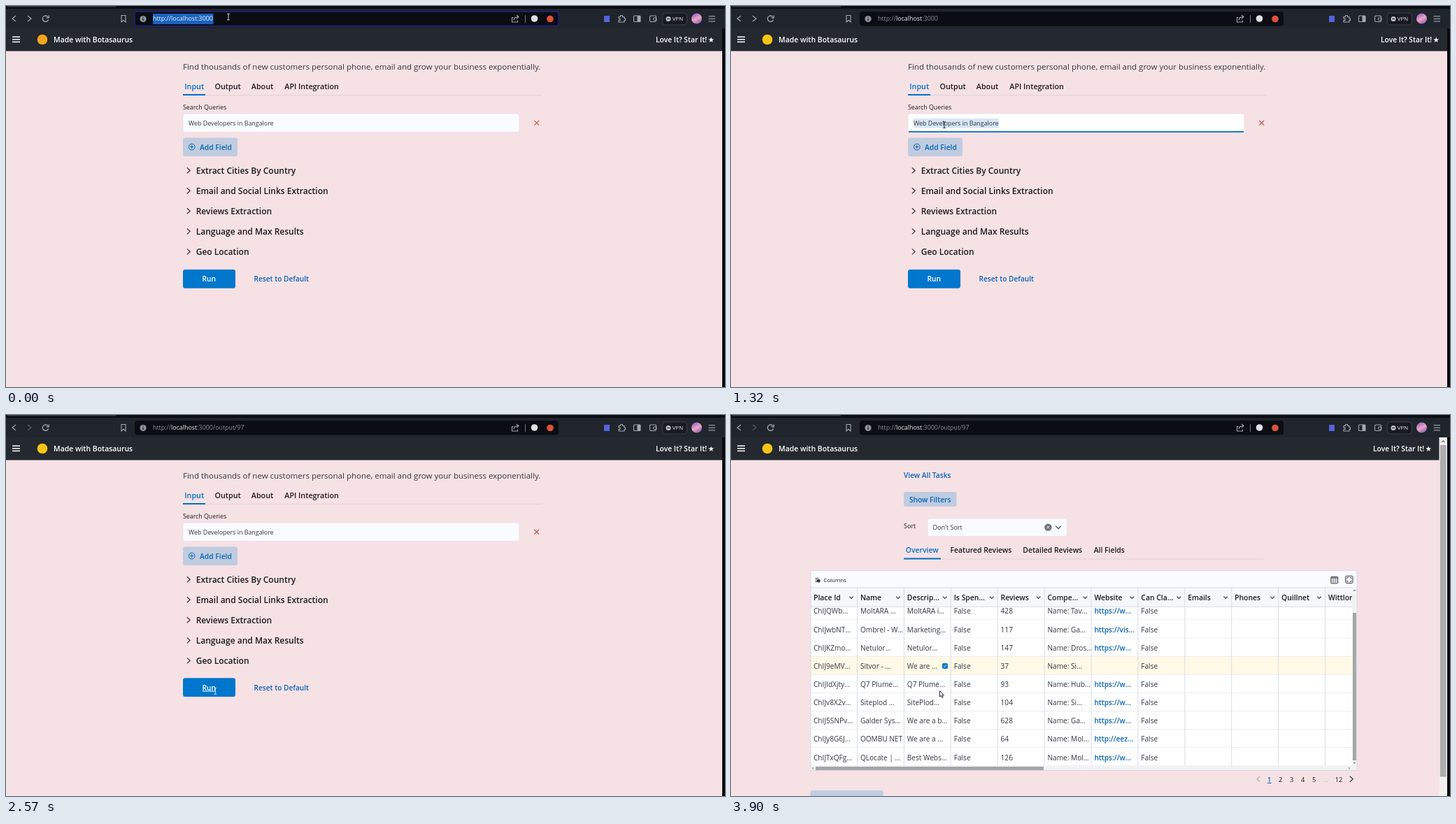
An HTML page with a canvas for the animation above (4430 ms loop, 1028 px wide and 545 px high).

```html
<!DOCTYPE html>
<html lang="en">
<head>
<meta charset="utf-8">
<title>Search tool demo</title>
<style>
html, body { margin: 0; width: 100%; height: 100%; overflow: hidden; background: #f6e1e5; }
canvas { display: block; width: 1028px; height: 545px; }
</style>
</head>
<body>
<canvas id="stage"></canvas>
<script>
const LOOP = 4430, W = 1028, H = 545;
const canvas = document.getElementById('stage');
const ctx = canvas.getContext('2d');
const dpr = window.devicePixelRatio || 1;
canvas.width = W * dpr;
canvas.height = H * dpr;

const PINK = '#f6e1e5', INK = '#1a1c21', BODY = '#343741', BLUE = '#0071c2';
const LINK = '#0a66b3', SOFT = '#c0cce0', FIELD = '#fafbfe', RULE = '#d8dde7', ICON = '#a4a8af';

// ---------- helpers ----------
function rect(x, y, w, h, color) {
  ctx.fillStyle = color;
  ctx.fillRect(x, y, w, h);
}
function box(x, y, w, h, r, fill, stroke, lw = 1) {
  ctx.beginPath();
  ctx.roundRect(x, y, w, h, r);
  if (fill) { ctx.fillStyle = fill; ctx.fill(); }
  if (stroke) { ctx.strokeStyle = stroke; ctx.lineWidth = lw; ctx.stroke(); }
}
function disc(x, y, r, fill, stroke, lw = 1) {
  ctx.beginPath();
  ctx.arc(x, y, r, 0, 7);
  if (fill) { ctx.fillStyle = fill; ctx.fill(); }
  if (stroke) { ctx.strokeStyle = stroke; ctx.lineWidth = lw; ctx.stroke(); }
}
function line(color, lw, ...p) {
  ctx.beginPath();
  for (let i = 0; i < p.length; i += 2) ctx.lineTo(p[i], p[i + 1]);
  ctx.strokeStyle = color;
  ctx.lineWidth = lw;
  ctx.stroke();
}
// Text vertically centred on its capital letters; returns its width.
function text(s, x, cy, size, color, weight = 400, align = 'left') {
  ctx.font = `${weight} ${size}px "Open Sans", "Noto Sans", sans-serif`;
  ctx.textAlign = align;
  ctx.fillStyle = color;
  ctx.fillText(s, x, cy + size * 0.36);
  return ctx.measureText(s).width;
}
const bold = (s, x, cy, size, color = INK, align) => text(s, x, cy, size, color, 600, align);
const chevron = (x, y, w, h, color, lw = 1.2) => line(color, lw, x - w, y - h, x + w, y, x - w, y + h);
const chevronDown = (x, y, w, color = BODY) => line(color, 1.1, x - w, y - w / 2, x, y + w / 2, x + w, y - w / 2);
function cross(x, y, r, color, lw) {
  line(color, lw, x - r, y - r, x + r, y + r);
  line(color, lw, x + r, y - r, x - r, y + r);
}
function menu(x, y, w, gap, color, lw) {
  for (const i of [-1, 0, 1]) line(color, lw, x, y + i * gap, x + w, y + i * gap);
}
function clip(x, y, w, h, draw) {
  ctx.save();
  ctx.beginPath();
  ctx.rect(x, y, w, h);
  ctx.clip();
  draw();
  ctx.restore();
}

// ---------- browser bar ----------
function address(t) {
  const selected = t < 130;
  box(184, 8, 606, 20.5, 4, '#0b0d13', selected && '#1f1f86', 1.6);
  disc(196, 18.5, 4.6, '#8f949b');
  rect(195.4, 17.8, 1.2, 3.2, '#14171c');
  rect(195.4, 15.6, 1.2, 1.2, '#14171c');
  if (selected) rect(210, 11, 86.5, 15, '#1b63bd');
  const dim = selected ? '#f2f6fc' : '#8c9097';
  const path = t >= 2430 ? ':3000/output/97' : ':3000';
  let x = 210;
  for (const [s, c] of [['http://', dim], ['localhost', '#eceef1'], [path, dim]])
    x += text(s, x, 18.2, 8.9, c);
}
function browser(t) {
  rect(0, 0, W, 33, '#20242c');
  rect(0, 0, W, 4, '#0b0d12');
  rect(2, 0, 155, 1.5, '#363b43');
  chevron(11.5, 18, -2.5, 4, ICON);
  chevron(33.5, 18, 2.5, 4, t >= 2430 ? '#555a62' : ICON);
  if (t >= 130 && t < 530) cross(56.5, 18, 3.5, ICON, 1.2);
  else {
    ctx.beginPath();
    ctx.arc(56.5, 18.2, 4.2, 0.3, 5.6);
    ctx.strokeStyle = ICON;
    ctx.lineWidth = 1.3;
    ctx.stroke();
    line(ICON, 1.3, 61.2, 13.5, 61.2, 16.8, 57.8, 16.8);
  }
  line(ICON, 1.1, 165, 13.5, 171, 13.5, 171, 23, 168, 20.3, 165, 23, 165, 13);
  address(t);

  line(ICON, 1.1, 725.5, 16.5, 723.5, 16.5, 723.5, 23, 731.5, 23, 731.5, 20.5);
  line(ICON, 1.1, 726, 20, 727.5, 16.5, 732.5, 15.5);
  line(ICON, 1.1, 730, 12.8, 733, 15.5, 730, 18.2);
  rect(742, 13, 1, 11, '#71757c');
  disc(755.5, 18, 4.8, '#dfe2e6');
  disc(778, 18.5, 4.8, '#e0523a');

  box(855, 14, 8, 9, 0, '#5663dc');
  line(ICON, 1.1, 876, 15.5, 878.5, 15.5, 878.5, 13.5, 881.5, 13.5, 881.5, 15.5, 884, 15.5, 884, 18,
    885.5, 18, 885.5, 20.5, 884, 20.5, 884, 23, 876, 23, 876, 20.5, 878, 20.5, 878, 18, 876, 18, 876, 15);
  box(897.5, 14, 9.5, 8.5, 1, null, ICON, 1.1);
  rect(902.5, 14, 4.5, 8.5, ICON);
  box(920.5, 14, 9, 8.5, 1.5, null, ICON, 1.1);
  box(925.5, 17, 4.5, 3.5, 1, null, ICON);
  box(938.5, 10, 35, 17, 4, '#171a20', '#3d424a');
  disc(947, 18.5, 3.6, '#b9bdc3');
  rect(945, 18, 4, 1, '#171a20');
  text('VPN', 952.8, 18.6, 7.8, '#eceef1');
  const g = ctx.createLinearGradient(983, 11, 991, 26);
  g.addColorStop(0, '#8b63c9');
  g.addColorStop(0.5, '#f0a5bd');
  g.addColorStop(1, '#7d58c2');
  disc(987.5, 18, 7.5, g);
  menu(1004.5, 18.3, 9.5, 3.6, ICON, 1.1);
}
function header(t, right) {
  rect(0, 32, 1024, 32.5, '#24282f');
  menu(9, 47.8, 11, 3.6, '#fff', 1.5);
  disc(52, 48, 7.3, t < 130 ? '#f6a41f' : '#fbc414');
  bold('Made with Botasaurus', 68, 48.3, 10.45, '#fff');
  bold('Love It? Star It!', right - 84, 48.3, 10.3, '#fff');
  ctx.font = '10.5px "DejaVu Sans", sans-serif';
  ctx.textAlign = 'right';
  ctx.fillText('★', right, 52);
}

// ---------- input page ----------
const SECTIONS = ['Extract Cities By Country', 'Email and Social Links Extraction',
  'Reviews Extraction', 'Language and Max Results', 'Geo Location'];

function tabs(labels, cy, size, lineY, x0, x1, activeEnd) {
  rect(x0, lineY - 0.5, x1 - x0, 1, '#e3d3da');
  rect(x0, lineY - 1.5, activeEnd - x0, 2, BLUE);
  labels.forEach(([s, x], i) => bold(s, x, cy, size, i ? INK : BLUE));
}
function inputPage(t) {
  const focused = t >= 860 && t < 1870, selected = t >= 920 && t < 1870;
  const hover = t >= 1570, lift = t >= 1940 ? -0.7 : 0;
  header(t, 1013);
  text('Find thousands of new customers personal phone, email and grow your business exponentially.',
    253, 87.3, 11.5, BODY);
  tabs([['Input', 255.3], ['Output', 298.5], ['About', 350.8], ['API Integration', 398.3]],
    115.3, 10.75, 127.5, 253, 766, 285);
  text('Search Queries', 253, 145.2, 8.8, INK);
  box(253, 154, 481, 26.5, 3, focused ? '#fff' : FIELD, '#ecdfe7', 0.8);
  if (focused) rect(254, 179, 479, 1.8, BLUE);
  if (selected) rect(261, 161, 122, 13.5, '#d6e7f3');
  text('Web Developers in Bangalore', 261, 168, 8.88, BODY);
  cross(758.7, 167.2, 3.4, t < 130 ? '#d4552f' : '#bd3f3f', 1.1);

  box(253, 188.5, 78, 26.5, 3, SOFT);
  disc(265.7, 201.6, 4.4, null, LINK, 1);
  line(LINK, 1, 263.2, 201.6, 268.2, 201.6);
  line(LINK, 1, 265.7, 199.1, 265.7, 204.1);
  bold('Add Field', 277, 202.2, 10.3, LINK);

  SECTIONS.forEach((s, i) => {
    const cy = 235.7 + i * 29.05;
    chevron(261, cy - 0.5, 2.2, 4, BODY);
    bold(s, 271.7, cy, 12);
  });
  box(253, 377 + lift, 75, 26.8, 3, '#0077cc');
  bold('Run', 290.3, 390.6 + lift, 10.2, '#fff', 'center');
  if (hover) rect(280.8, 395.3 + lift, 19.2, 1, '#fff');
  bold('Reset to Default', 354.5, 390.6, 10.15, LINK);
}

// ---------- results page ----------
const COL = 66.9, ROW = 26.13, TOP = 274.4;
const HEADS = ['Place Id', 'Name', 'Descrip…', 'Is Spen…', 'Reviews', 'Compe…',
  'Website', 'Can Cla…', 'Emails', 'Phones', 'Quillnet', 'Wittlor'];
const ROWS = [
  '8Wlw…;Tavuro - …;Tavuro is a…;599;PL…;https://w…',
  'QWb…;MoltARA …;MoltARA i…;428;Tav…;https://w…',
  'wbNT…;Ombrel - W…;Marketing…;117;Ga…;https://vis…',
  'KZmo…;Netulor…;Netulor…;147;Dros…;https://w…',
  '9eMV…;Sitvor - …;We are a …;37;Si…;',
  'IdXjty…;Q7 Plume…;Q7 Plume…;93;Hub…;https://w…',
  'v8X2v…;Siteplod …;SitePlod…;104;Si…;https://w…',
  '5SNPv…;Galder Sys…;We are a b…;628;Ga…;https://w…',
  'y8G6J…;OOMBU NET;We are a …;64;Mol…;http://eez…',
  'TxQFg…;QLocate | …;Best Webs…;126;Mol…;https://w…'
].map(r => r.split(';'));
const colX = i => 118 + i * COL;

function rows(t, scroll) {
  ROWS.forEach(([id, name, about, reviews, rival, site], i) => {
    const y = TOP + i * ROW - scroll, cy = y + 13.8;
    const editing = i === 4 && t >= 2970;
    rect(114, y, 774, ROW, i === 4 ? '#fff9e8' : '#fff');
    rect(114, y + ROW - 0.5, 774, 1, RULE);
    const cells = ['ChIJ' + id, name, editing ? 'We are …' : about, 'False', reviews, 'Name: ' + rival];
    cells.forEach((s, c) => text(s, colX(c), cy, 10.1, BODY));
    bold(site, colX(6), cy, 10.1, LINK);
    text('False', colX(7), cy, 10.1, BODY);
    if (editing) {
      box(302, cy - 4.2, 8, 8, 2, '#0077cc');
      line('#fff', 1, 304.3, cy + 1.8, 308, cy - 1.9);
    }
  });
}
function gridIcons(t) {
  if (t < 2690) {
    for (const [x, y, s] of [[120, 232, 7.5], [858, 231, 10], [879, 230.5, 10]]) box(x, y, s, s, 2, '#e7eaef');
    box(750, 516, 9, 9, 2, '#f0dee3');
    return;
  }
  menu(120.5, 236, 5, 2.4, BODY, 1);
  disc(125.3, 237.3, 2.4, BODY);
  box(857.8, 231.3, 9.8, 9.6, 1, null, BODY);
  rect(858, 232.5, 9.5, 1.2, BODY);
  for (const y of [236, 238.5]) line('#858a93', 0.8, 858, y, 867.5, y);
  for (const x of [861, 864.3]) line('#858a93', 0.8, x, 234, x, 240.5);
  box(878.8, 230.3, 10.2, 10.2, 1.5, null, BODY);
  for (const sx of [-1, 1]) for (const sy of [-1, 1])
    line(BODY, 0.9, 883.9 + sx * 3, 235.4 + sy, 883.9 + sx * 3, 235.4 + sy * 3, 883.9 + sx, 235.4 + sy * 3);
  chevron(754, 520.7, -2, 3.8, '#b9adb5');
}
function grid(t) {
  const scrolled = t >= 3900;
  rect(114, 222, 781, 286.5, '#fff');
  rect(114, 222, 781, 25, '#f9fbfd');
  rect(114, 247, 781, 27, '#f5f7fa');
  clip(114, 274.4, 774, 226.6, () => rows(t, scrolled ? 33.5 : 0));
  clip(114, 247, 774, 254, () => {
    HEADS.forEach((s, i) => {
      bold(s, colX(i), 261.5, 10.4);
      chevronDown(colX(i) + 54, 261, 2.8);
      rect(colX(i) + 62, 247, 1, 254, RULE);
    });
  });
  rect(114, 246.5, 781, 1, RULE);
  rect(114, 273.8, 774, 1, RULE);
  rect(888, 247, 7, 254, '#f3f3f4');
  rect(889, scrolled ? 283 : 255, 5, 211, '#a6a6a8');
  rect(114, 501, 781, 7.5, '#f3f3f4');
  rect(121, 503, 326, 5, '#a6a6a8');
  chevron(117, 505.3, -1, 1.4, '#8b8b8d', 1);
  chevron(884, 505.3, 1, 1.4, '#8b8b8d', 1);
  chevronDown(891.5, 251, -1.6, '#8b8b8d');
  chevronDown(891.5, 497.5, 1.6, '#8b8b8d');
  box(114, 222.5, 781, 286, 0, null, '#d3dae6', 1);
  text('Columns', 132.3, 236, 7.9, INK);
}
function resultsPage(t) {
  header(t, 1002);
  rect(1012.5, 32, 11.5, 513, '#f1f1f2');
  rect(1013.8, 43, 8.8, 474.5, '#adacae');
  chevronDown(1018.2, 38, -2.4, '#77777a');

  bold('View All Tasks', 247, 86.5, 10.2, LINK);
  box(247, 110, 75.5, 21, 3, SOFT);
  bold('Show Filters', 284.7, 121.3, 10.2, LINK, 'center');
  text('Sort', 247, 158.7, 9, INK);
  box(281, 148, 199.5, 25.5, 3, FIELD, '#ecdfe7', 0.8);
  text("Don't Sort", 288.5, 161, 9, BODY);
  disc(453.4, 160.6, 5.2, '#6c727c');
  cross(453.4, 160.6, 1.8, '#fff', 1);
  chevronDown(468, 160.6, 4);
  tabs([['Overview', 249.8], ['Featured Reviews', 313.5], ['Detailed Reviews', 417.3], ['All Fields', 518.7]],
    193.6, 10.4, 206, 247, 761, 300);

  grid(t);
  gridIcons(t);
  bold('1', 769.7, 521.3, 9.2, LINK, 'center');
  rect(767, 526, 5.5, 1, LINK);
  [2, 3, 4, 5].forEach((n, i) => text(n, 785.7 + i * 16, 521.3, 9.2, INK, 400, 'center'));
  text('…', 850, 521.3, 9.2, '#b3a7af', 400, 'center');
  text('12', 869, 521.3, 9.2, INK, 400, 'center');
  chevron(887, 520.7, 2.2, 4, BODY);
  box(113.5, 537, 104, 12, 3, SOFT);
}

// ---------- pointer ----------
const PATH = [[790, 318, 15.5], [900, 305, 170], [1320, 305, 170], [1620, 301, 410], [1800, 298, 396]];

function pointerAt(t) {
  if (t <= PATH[0][0]) return PATH[0].slice(1);
  for (let i = 1; i < PATH.length; i++) {
    const [t0, x0, y0] = PATH[i - 1], [t1, x1, y1] = PATH[i];
    if (t < t1) {
      const k = (t - t0) / (t1 - t0), e = k * k * (3 - 2 * k);
      return [x0 + (x1 - x0) * e, y0 + (y1 - y0) * e];
    }
  }
  return PATH[PATH.length - 1].slice(1);
}
function beam(x, y, color) {
  line(color, 1, x, y - 4, x, y + 4);
  for (const s of [-4.3, 4.3]) line(color, 1, x - 1.8, y + s, x + 1.8, y + s);
}
function shape(x, y, d) {
  ctx.save();
  ctx.translate(x, y);
  const p = new Path2D(d);
  ctx.fillStyle = '#fff';
  ctx.fill(p);
  ctx.strokeStyle = '#16181c';
  ctx.lineWidth = 0.9;
  ctx.lineJoin = 'round';
  ctx.stroke(p);
  ctx.restore();
}
const arrow = (x, y) => shape(x, y, 'M0 0V8.6L2 6.8L3.3 9.8L4.7 9.2L3.4 6.3H6Z');
const hand = (x, y) => shape(x, y,
  'M0 .8Q.9-.6 1.8.8V4.4Q3-.0 3.3 4.5Q4.7 3.7 4.9 5Q6.4 4.6 6.2 6.4V8.6L5 11.6H.3L-2.9 7.8Q-3.2 6.2-1.6 6.8L0 8Z');

function pointer(t) {
  if (t >= 2690) return arrow(298.5, 394.5);
  if (t >= 2570) return beam(299.3, 395, t < 2620 ? '#c9d8e6' : '#33363c');
  const [x, y] = pointerAt(t);
  if (y < 28) beam(x, y, '#d5d7da');
  else if (y > 154 && y < 181) beam(x, y, '#22252a');
  else if (y > 377 && y < 404 || y > 188 && y < 215) hand(x, y);
  else arrow(x, y);
}

// ---------- loop ----------
function draw(t) {
  ctx.setTransform(dpr, 0, 0, dpr, 0, 0);
  rect(0, 0, W, H, PINK);
  browser(t);
  if (t < 2620) inputPage(t);
  else resultsPage(t);
  rect(1024, 32, 4, 513, '#08090c');
  pointer(t);
}
const start = performance.now();
function tick() {
  draw((performance.now() - start) % LOOP);
  requestAnimationFrame(tick);
}
tick();
</script>
</body>
</html>
```
